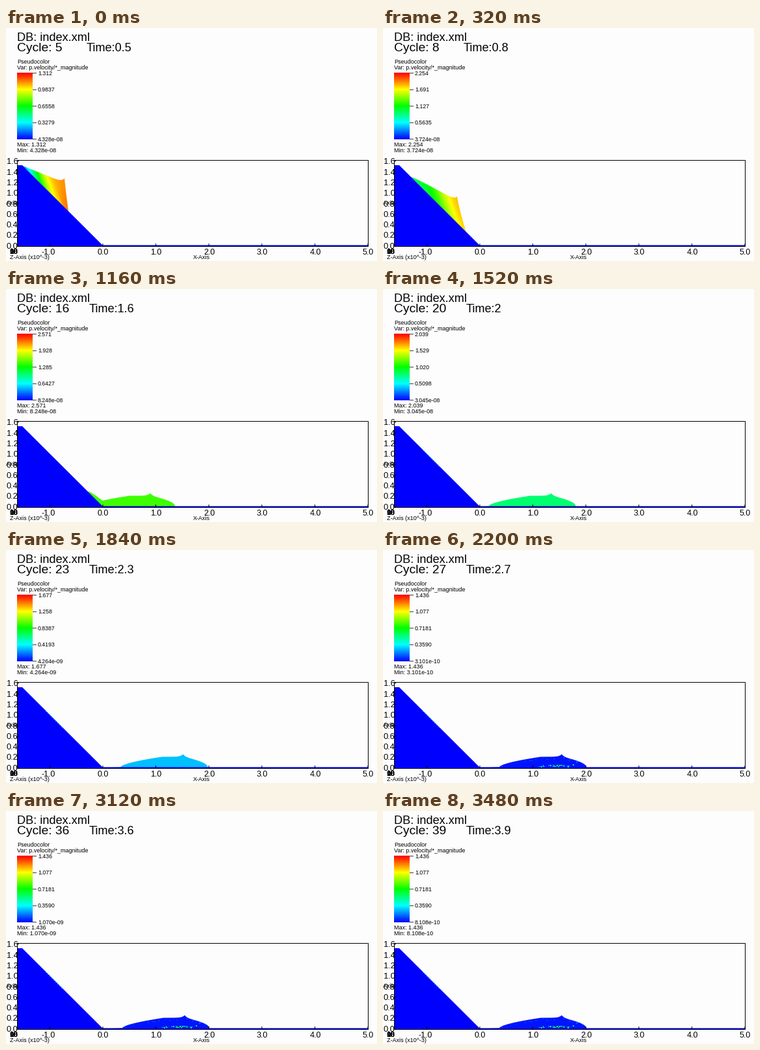
These frames come from a looping animation (571x360 px, 3520 ms). A matplotlib script:

```python
import numpy as np
import matplotlib.pyplot as plt
from matplotlib.animation import FuncAnimation
from matplotlib.colors import LinearSegmentedColormap
from matplotlib.patches import Polygon

W, H, DPI = 571, 360, 100
INTERVAL, FRAMES = 40, 88
FIRST_CYCLE, CYCLE_MS = 5, 100
X0, Y0, UNIT = 149, 336.3, 81.6        # pixel position of the data origin, pixels per unit
CREST_X, FLAT_Y, TOE_X, TOE_Y = 25, 212, 148.5, 335.5
IMPACT_CYCLE, SLIDE_CYCLE, REST_CYCLE = 11, 16, 25
BRAKING = 1.6                          # units per second squared
HOT = LinearSegmentedColormap.from_list("hot", ["blue", "cyan", "lime", "yellow", "red"])

plt.rcParams["font.family"] = "Liberation Sans"
fig = plt.figure(figsize=(W / DPI, H / DPI), dpi=DPI, facecolor="#fdfdfd")
ax = fig.add_axes([0, 0, 1, 1])


def px(size):
    return size * 72 / DPI


def label(x, y, text="", size=9.0, **kw):
    return ax.text(x, y, text, fontsize=px(size), color="black", zorder=6, **kw)


def line(xs, ys, width=1.0):
    ax.plot(xs, ys, color="black", lw=px(width), zorder=4, solid_capstyle="butt", snap=False)


def mix(a, b, s):
    return a * (1 - s) + b * s


def ground(x):
    return FLAT_Y + np.clip(x - CREST_X, 0, TOE_X - CREST_X)


# Shape of the mass: rear x, crest x, front x, body height, fill, rear power, front power, spike
START = np.array([26, 90, 96, 38, 1.0, 1.0, 1.0, 7])
IMPACT = np.array([68, 149, 173, 22, 1.2, 0.75, 0.8, 13])
REST = np.array([179, 275, 313, 16, 1.5, 0.6, 0.5, 4])


def time_left(cycle):
    return max(REST_CYCLE - cycle, 0) / 10


def sliding(cycle):
    """The settled shape, braking evenly to its resting place."""
    shape = REST.copy()
    shape[:3] -= 0.5 * BRAKING * UNIT * time_left(cycle) ** 2
    return shape


def shape_at(cycle):
    if cycle <= IMPACT_CYCLE:
        s = (cycle ** 2 - FIRST_CYCLE ** 2) / (IMPACT_CYCLE ** 2 - FIRST_CYCLE ** 2)
        return mix(START, IMPACT, s)
    if cycle < SLIDE_CYCLE:
        s = (cycle - IMPACT_CYCLE) / (SLIDE_CYCLE - IMPACT_CYCLE)
        return mix(IMPACT, sliding(SLIDE_CYCLE), s)
    return sliding(cycle)


def surface(cycle):
    rear, crest, front, body, fill, rear_power, front_power, spike = shape_at(cycle)
    x = np.union1d(np.linspace(rear, front, 150), [crest])
    back = np.clip(fill * (x - rear) / (crest - rear), 0, 1) ** rear_power
    face = np.clip((front - x) / (front - crest), 0, 1) ** front_power
    height = body * np.minimum(back, face) + spike * np.exp(-np.abs(x - crest) / 4) * face
    return x, ground(x) - height


def max_speed(cycle):
    return np.interp(cycle, [5, 11, 16, 20, 25], [1.3116, 3.1964, 2.5708, 2.0392, 1.43618])


def min_speed(cycle):
    lows = [4.328e-8, 3.204e-8, 8.248e-8, 3.045e-8, 3.101e-10, 1.549e-9, 8.108e-10]
    return np.exp(np.interp(cycle, [5, 11, 16, 20, 27, 32, 39], np.log(lows)))


LEFT, RIGHT, TOP, BOTTOM = 17, 320, 205, 338
X, Y = np.meshgrid(np.arange(LEFT, RIGHT) + 0.5, np.arange(TOP, BOTTOM) + 0.5)


def bump(x, y, spread):
    return np.exp(-((X - x) ** 2 + (Y - y) ** 2) / spread)


IMPACT_FIELD = (0.81 + 0.02 * np.clip((120 - X) / 50, 0, 1) - 0.06 * bump(147, 308, 300)
                - 0.26 * bump(149, 333, 70) + 0.04 * bump(169, 332, 40))


def speed_field(cycle, front):
    """Speed as a fraction of the maximum."""
    if cycle <= IMPACT_CYCLE:
        along = X - 0.35 * (Y - 220) - (front - START[2])
        early = 0.87 / (1 + np.exp((44 - along) / 9))
        early += 0.04 * np.clip((Y - 245) / 30, 0, 1) * (along > 68)
        return mix(early, IMPACT_FIELD, (cycle - FIRST_CYCLE) / (IMPACT_CYCLE - FIRST_CYCLE))
    level = max(BRAKING * time_left(cycle) / max_speed(cycle), 0.02)
    settled = min((cycle - IMPACT_CYCLE) / (SLIDE_CYCLE - IMPACT_CYCLE), 1)
    return mix(IMPACT_FIELD, min(level, 0.56), settled)


# Legend
label(17, 19.5, "DB: index.xml", 18.2)
cycle_text = label(17, 36, size=19.3)
time_text = label(124, 36, size=18.2)
label(17, 55, "Pseudocolor")
label(17, 64, "Var: p.velocity/*_magnitude")
ax.imshow(np.linspace(1, 0, 256)[:, None], cmap=HOT, extent=(17, 41, 172, 69), aspect="auto")
scale_texts = []
for k in range(5):
    y = 69.8 + 25.5 * k
    line([41, 47], [y, y], 0.8)
    scale_texts.append(label(49, y + 2.8, size=8.8))
max_text = label(17, 183)
min_text = label(17, 191.5)

# Moving mass, with the terrain drawn over its base
outline = Polygon([[0, 0], [1, 0], [1, 1]], visible=False)
ax.add_patch(outline)
mass = ax.imshow(IMPACT_FIELD, cmap=HOT, vmin=0, vmax=1, interpolation="nearest",
                 extent=(LEFT, RIGHT, BOTTOM, TOP), aspect="auto", zorder=2)
terrain = [(17, FLAT_Y), (CREST_X, FLAT_Y), (TOE_X, TOE_Y), (557, TOE_Y), (557, 338), (17, 338)]
ax.add_patch(Polygon(terrain, facecolor="blue", edgecolor="none", zorder=3))


def specks(x, y, level, alpha=1.0):
    return ax.scatter(x, y, c=level, cmap=HOT, vmin=0, vmax=1, s=px(1.4) ** 2,
                      marker="s", linewidths=0, alpha=alpha, zorder=5)


rng = np.random.default_rng(4)
base_specks = specks(rng.normal(266, 12, 36).clip(240, 302), rng.uniform(332, 335, 36),
                     rng.uniform(0.2, 0.55, 36))
rim_x = rng.uniform(182, 311, 24)
rim_specks = specks(rim_x, np.interp(rim_x, *surface(REST_CYCLE)) + rng.uniform(1, 4, 24),
                    rng.uniform(0.06, 0.15, 24), 0.6)
slope_x = np.arange(62, 88, 3.0)
slope_specks = specks(slope_x, ground(slope_x) + 0.5, np.full(slope_x.size, 0.25), 0.6)

# Axes
line([17, 558], [204.5, 204.5])
line([17.5, 17.5], [204, 338])
line([557.5, 557.5], [204, 338])
line([17, 558], [337.5, 337.5])
for k in range(-1, 6):
    x = X0 + UNIT * k
    line([x, x], [333, 337])
    shift = -2 if k < 0 else 0.5
    label(x + shift, 349.5, f"{k:.1f}", 12.5, ha="center")
for k in range(9):
    y = Y0 - UNIT * 0.2 * k
    line([17, 20], [y, y])
    label(18.5, y + 4.5, f"{0.2 * k:.1f}", 12.8, ha="right")
label(18, 273, "Y-Axis", ha="right")
for text in ("10", "18", "0"):
    label(5.5, 349, text, 11.5, weight="bold")
label(6, 357, "Z-Axis (x10^-3)")
label(288, 357, "X-Axis")

ax.set_xlim(0, W)
ax.set_ylim(H, 0)
ax.axis("off")


def draw(frame):
    cycle = FIRST_CYCLE + frame * INTERVAL // CYCLE_MS
    high, low = max_speed(cycle), min_speed(cycle)
    cycle_text.set_text(f"Cycle: {cycle}")
    time_text.set_text(f"Time:{cycle / 10:g}")
    time_text.set_x(124 if cycle < 10 else 128)
    for k, text in enumerate(scale_texts):
        text.set_text(f"{mix(high, low, k / 4):#.4g}")
    max_text.set_text(f"Max: {high:#.4g}")
    min_text.set_text(f"Min: {low:#.4g}")

    x, y = surface(cycle)
    outline.set_xy(np.vstack([np.column_stack([x, y]), [(x[-1], y[-1] + 1), (TOE_X, 336.5)]]))
    mass.set_data(speed_field(cycle, x[-1]))
    mass.set_clip_path(outline)
    base_specks.set_visible(cycle >= REST_CYCLE)
    rim_specks.set_visible(cycle >= REST_CYCLE)
    slope_specks.set_visible(cycle >= 20)
    return []


animation = FuncAnimation(fig, draw, frames=FRAMES, interval=INTERVAL, repeat=True, repeat_delay=0)
plt.show()
```
